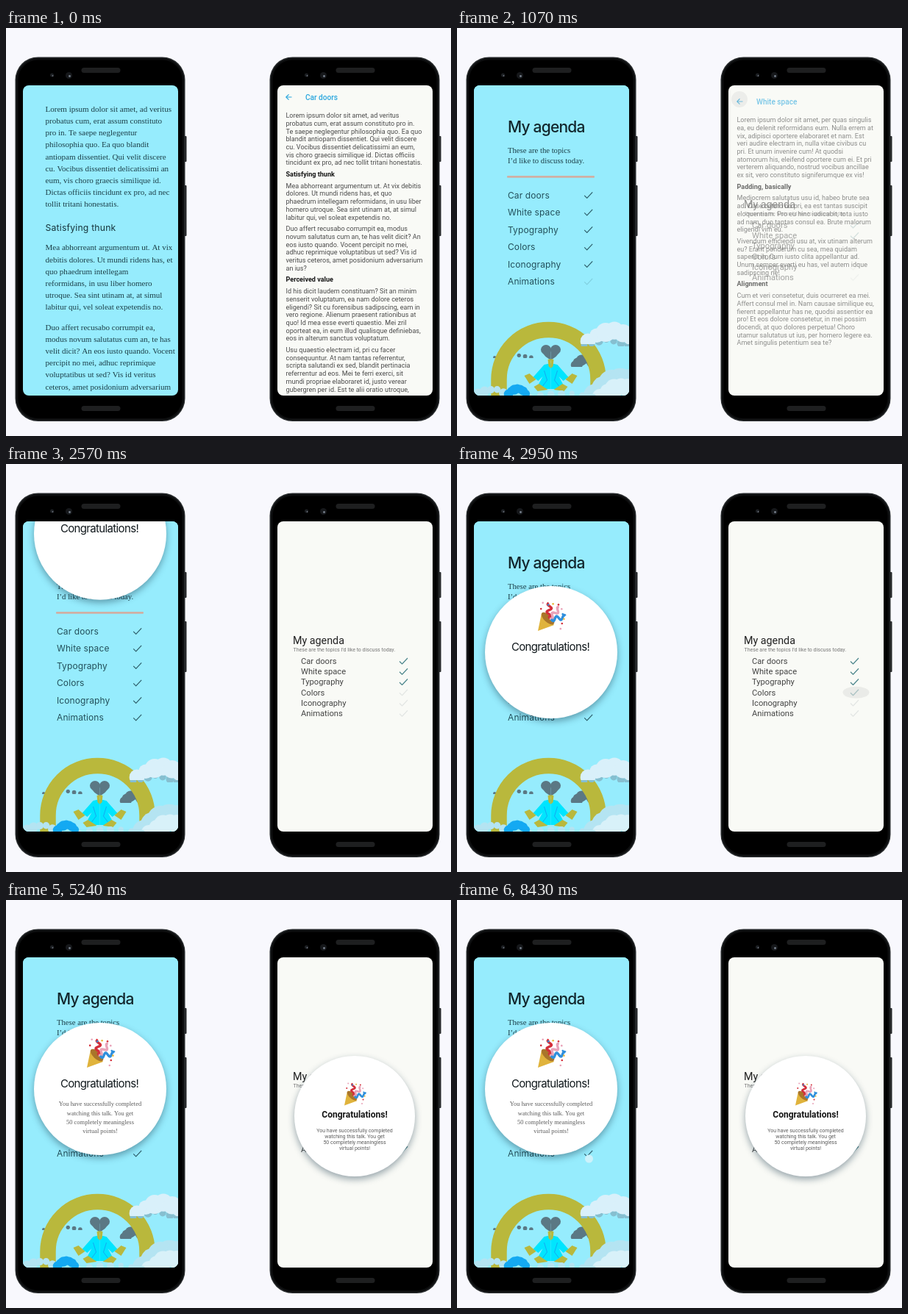
Recreate the animation shown at these times as an HTML page with a canvas. Size 605 by 555 pixels, loop 8470 ms.

```html
<!DOCTYPE html>
<html lang="en">
<head>
<meta charset="utf-8">
<title>Agenda app comparison</title>
<style>
html, body { margin: 0; width: 100%; height: 100%; overflow: hidden; background: #f8f8fd; }
canvas { display: block; width: 605px; height: 555px; }
</style>
</head>
<body>
<canvas id="stage"></canvas>
<script>
const W = 605, H = 555, LOOP = 8470, TAU = Math.PI * 2;
const SHIFT = 346;              // distance between the two phones
const SKY = '#96ecfd', PAPER = '#f9faf6', OLIVE = '#b9b83c', SLATE = '#5b7884';
const SERIF = '"Liberation Serif", serif', SANS = 'Inter, sans-serif', ROBOTO = 'Roboto, sans-serif';

const canvas = document.getElementById('stage');
const ctx = canvas.getContext('2d');
const dpr = window.devicePixelRatio || 1;
canvas.width = W * dpr;
canvas.height = H * dpr;

const topics = ['Car doors', 'White space', 'Typography', 'Colors', 'Iconography', 'Animations'];
const praise = ['You have successfully completed', 'watching this talk. You get',
  '50 completely meaningless', 'virtual points!'];

// '#' marks a heading, '|' a line break
const leftArticle = [
  'Lorem ipsum dolor sit amet, ad veritus|probatus cum, erat assum constituto|pro in. Te saepe neglegentur|philosophia quo. Ea quo blandit|antiopam dissentiet. Qui velit discere|cu. Vocibus dissentiet delicatissimi an|eum, vis choro graecis similique id.|Dictas officiis tincidunt ex pro, ad nec|tollit tritani honestatis.',
  '#Satisfying thunk',
  'Mea abhorreant argumentum ut. At vix|debitis dolores. Ut mundi ridens has, et|quo phaedrum intellegam|reformidans, in usu liber homero|utroque. Sea sint utinam at, at simul|labitur qui, vel soleat expetendis no.',
  'Duo affert recusabo corrumpit ea,|modus novum salutatus cum an, te has|velit dicit? An eos iusto quando. Vocent|percipit no mei, adhuc reprimique|voluptatibus ut sed? Vis id veritus|ceteros, amet posidonium adversarium'
];
const carDoors = [
  'Lorem ipsum dolor sit amet, ad veritus|probatus cum, erat assum constituto pro in.|Te saepe neglegentur philosophia quo. Ea quo|blandit antiopam dissentiet. Qui velit discere|cu. Vocibus dissentiet delicatissimi an eum,|vis choro graecis similique id. Dictas officiis|tincidunt ex pro, ad nec tollit tritani honestatis.',
  '#Satisfying thunk',
  'Mea abhorreant argumentum ut. At vix debitis|dolores. Ut mundi ridens has, et quo|phaedrum intellegam reformidans, in usu liber|homero utroque. Sea sint utinam at, at simul|labitur qui, vel soleat expetendis no.',
  'Duo affert recusabo corrumpit ea, modus|novum salutatus cum an, te has velit dicit? An|eos iusto quando. Vocent percipit no mei,|adhuc reprimique voluptatibus ut sed? Vis id|veritus ceteros, amet posidonium adversarium|an ius?',
  '#Perceived value',
  'Id his dicit laudem constituam? Sit an minim|senserit voluptatum, ea nam dolore ceteros|eligendi? Sit cu forensibus sadipscing, eam in|vero regione. Alienum praesent rationibus at|quo! Id mea esse everti quaestio. Mei zril|oporteat ea, in eum illud qualisque definiebas,|eos in alterum sanctus voluptatum.',
  'Usu quaestio electram id, pri cu facer|consequuntur. At nam tantas referrentur,|scripta salutandi ex sed, blandit pertinacia|referrentur ad eos. Mei te ferri exerci, sit|mundi propriae elaboraret id, justo verear|gubergren per id. Est te alii oratio utroque,'
];
const whiteSpace = [
  'Lorem ipsum dolor sit amet, per quas singulis|ea, eu delenit reformidans eum. Nulla errem at|vix, adipisci oportere elaboraret et nam. Est|veri audire electram in, nulla vitae civibus cu|pri. Et unum invenire cum! At quodsi|atomorum his, eleifend oportere cum ei. Et pri|verterem aliquando, nostrud vocibus ancillae|ex sit, vero constituto signiferumque ex vis!',
  '#Padding, basically',
  'Mediocrem salutatus usu id, habeo brute sea|ad. Case cetero no pri, ea est tantas suscipit|eloquentiam. Pro eu hinc iudicabit, tota iusto|ad nam, duo tantas consul ea. Brute malorum|eligendi vim eu.',
  'Vivendum efficiendi usu at, vix utinam alterum|eu? Erant ponderum cu sea, mea quidam|saperet in. Cum iusto clita appellantur ad.|Unum semper everti eu has, vel autem idque|sadipscing ne!',
  '#Alignment',
  'Cum et veri consetetur, duis ocurreret ea mei.|Affert consul mel in. Nam causae similique eu,|fierent appellantur has ne, quodsi assentior ea|pro! Et eos dolore consetetur, in mei possim|docendi, at quo dolores perpetua! Choro|utamur salutatus ut ius, per homero legere ea.|Amet singulis petentium sea te?'
];

const span = (t, a, b) => Math.max(0, Math.min(1, (t - a) / (b - a)));
const ease = u => u * u * (3 - 2 * u);

function random(seed) {
  return () => (seed = (seed * 16807) % 2147483647) / 2147483647;
}

// y is the optical middle of the capitals
function text(s, x, y, font, size, color, { weight = 400, gap = 0, align = 'left' } = {}) {
  ctx.font = `${weight} ${size}px ${font}`;
  ctx.letterSpacing = gap + 'px';
  ctx.textAlign = align;
  ctx.fillStyle = color;
  ctx.fillText(s, x, y + size * 0.35);
}

function box(x, y, w, h, r, color) {
  ctx.fillStyle = color;
  ctx.beginPath();
  ctx.roundRect(x, y, w, h, r);
  ctx.fill();
}

function disc(x, y, rx, ry, color) {
  ctx.fillStyle = color;
  ctx.beginPath();
  ctx.ellipse(x, y, rx, ry, 0, 0, TAU);
  ctx.fill();
}

function path(p) {
  ctx.beginPath();
  for (let i = 0; i < p.length; i += 2) ctx.lineTo(p[i], p[i + 1]);
}

function poly(color, ...p) {
  ctx.fillStyle = color;
  path(p);
  ctx.fill();
}

function line(color, width, ...p) {
  ctx.strokeStyle = color;
  ctx.lineWidth = width;
  path(p);
  ctx.stroke();
}

function faded(alpha, draw) {
  if (alpha <= 0) return;
  ctx.save();
  ctx.globalAlpha *= alpha;
  draw();
  ctx.restore();
}

function check(x, y, color, u = 1) {
  faded(u, () => line(color, 1.15, x - 5.5, y + 0.5, x - 2, y + 4, x + 5.5, y - 4));
}

// flat base, puffs rising towards the middle
function cloud(color, x, w, base, h, seed) {
  const rnd = random(seed * 7919), n = 7;
  ctx.save();
  ctx.beginPath();
  ctx.rect(0, 0, W, base);
  ctx.clip();
  for (let i = 0; i < n; i++) {
    const u = (i + 0.5) / n, r = h * (0.28 + 0.14 * rnd());
    disc(x + u * w, base - (h - r) * Math.sin(Math.PI * u) * (0.8 + 0.2 * rnd()), r, r, color);
  }
  ctx.restore();
}

function phone(x) {
  box(x + 229, 147, 4, 35, 1, '#26282a');
  box(x + 229, 214, 4, 69, 1, '#26282a');
  box(x, 39.5, 231, 495.5, 31, '#26292b');
  box(x + 1.5, 41, 228, 492.5, 29.5, '#0c0d0e');
  box(x + 4, 43.5, 223, 487.5, 27, '#000');
  for (const y of [54, 514]) box(x + 90, y, 53, 7, 3.5, '#1e1f20');
  disc(x + 50, 64, 2.5, 2.5, '#1d2024');
  disc(x + 51, 65, 0.9, 0.9, '#6d737c');
  disc(x + 73, 64.5, 4.5, 4.5, '#16181b');
  disc(x + 74, 65.5, 1.4, 1.4, '#77808c');
}

function inScreen(x, color, draw) {
  ctx.save();
  ctx.beginPath();
  ctx.roundRect(x, 78, 211, 422, 8);
  ctx.clip();
  ctx.fillStyle = color;
  ctx.fillRect(x, 78, 211, 422);
  draw();
  ctx.restore();
}

function drawLeftArticle() {
  const heading = (s, y) => text(s, 53.5, y, SANS, 12.2, '#16343c', { gap: 0.2 });
  heading('Car doors', 73);
  let y = 110;
  for (const part of leftArticle) {
    if (part[0] === '#') {
      y += 4.8;
      heading(part.slice(1), y);
      y += 27;
      continue;
    }
    for (const s of part.split('|')) {
      text(s, 53.5, y, SERIF, 11.05, '#1c3f48');
      y += 16.2;
    }
    y += 11;
  }
}

function drawArch() {
  ctx.strokeStyle = OLIVE;
  ctx.lineWidth = 21.5;
  ctx.beginPath();
  ctx.moveTo(57, 500);
  ctx.arc(124.5, 478, 67.5, Math.PI, TAU);
  ctx.lineTo(192, 500);
  ctx.stroke();
}

// seated figure, each half a mirror of the other
function drawFigure() {
  for (const side of [-1, 1]) {
    ctx.save();
    ctx.translate(127.5, 431);
    ctx.scale(side, 1);
    disc(6.5, 6.5, 7, 6.5, SLATE);
    poly(SLATE, 0, 5, 13, 9, 7, 16, 0, 21);
    poly('#00e5ff', 0, 25, 9, 27, 24, 44, 17, 49, 11, 43, 20, 60, 0, 60);
    poly(OLIVE, 0, 19, 4, 20, 3, 29, 0, 32);
    poly(OLIVE, 20, 47, 29, 39, 36, 42, 29, 53);
    poly(OLIVE, 4, 61, 16, 53, 23, 57, 18, 63);
    line('#14a9f2', 1, 9, 35, 5, 48, 11, 56);
    ctx.restore();
  }
}

function drawScene() {
  cloud(SLATE, 47, 58, 449, 7, 2);
  cloud(SLATE, 158, 32, 461, 18, 3);
  drawArch();
  drawFigure();
  cloud('#86bfd0', 168, 70, 433, 14, 4);
  cloud('#d9f0fa', 172, 84, 430, 32, 5);
  cloud('#b4e4f2', 16, 60, 502, 16, 6);
  cloud('#b4e4f2', 182, 80, 506, 46, 7);
  cloud('#d8f1f9', 190, 66, 506, 32, 8);
  cloud('#b4e4f2', 92, 100, 504, 12, 9);
  cloud('#14a9f2', 68, 28, 500, 17, 10);
}

function drawLeftAgenda(t) {
  ctx.fillStyle = SKY;
  ctx.fillRect(23, 78, 211, 422);
  text('My agenda', 69, 134.7, SANS, 21, '#12262c', { weight: 450, gap: -0.8 });
  text('These are the topics', 69, 166, SERIF, 10.7, '#1c3f48');
  text('I’d like to discuss today.', 69, 180, SERIF, 10.7, '#1c3f48');
  box(68, 201, 119, 2.8, 1, '#d0afa4');
  topics.forEach((s, i) => {
    const y = 227.3 + i * 23.5;
    text(s, 69, y, SANS, 12, '#23505b', { gap: 0.1 });
    check(178.7, y, '#2b5b68', i < 5 ? 1 : 0.15 + 0.85 * span(t, 1050, 1350));
  });
  drawScene();
}

// party popper: cone, wavy streamers, scattered confetti
function popper(x, y, k) {
  const rnd = random(4242), hues = ['#d32f3a', '#e9a3b9', '#2f8fdc', '#e7b93e'];
  ctx.save();
  ctx.translate(x, y);
  ctx.scale(k, k);
  poly('#e0b33c', 0, 39, 5, 15, 14, 20, 22, 31);
  ctx.save();
  ctx.translate(13.5, 22);
  ctx.rotate(0.75);
  disc(0, 0, 11, 5, '#a9752a');
  ctx.restore();
  for (let i = 0; i < 3; i++) {
    ctx.save();
    ctx.translate(14 + i * 2, 21 + i);
    ctx.rotate(-1.45 + i * 0.65);
    const wave = [];
    for (let s = 0; s <= 20; s++) wave.push(s, 3 * Math.sin(s * 0.6));
    line(hues[i], 3.4, ...wave);
    ctx.restore();
  }
  for (let i = 0; i < 10; i++) {
    const a = -2.3 + i * 0.34, d = 16 + 6 * rnd();
    disc(15 + d * Math.cos(a), 21 + d * Math.sin(a), 1.3, 1.3, hues[i % 4]);
  }
  ctx.restore();
}

function plate(x, y, r) {
  ctx.save();
  ctx.shadowColor = 'rgba(20,50,70,.42)';
  ctx.shadowBlur = 10 * dpr;
  ctx.shadowOffsetY = 4 * dpr;
  disc(x, y, r, r, '#fff');
  ctx.restore();
}

function drawLeftPraise(t) {
  const y = -20 + 277 * ease(span(t, 2250, 2975));
  plate(128, y, 90);
  popper(110, y - 68, 1);
  text('Congratulations!', 127, y - 7, SANS, 15, '#10181c', { gap: -0.65, align: 'center' });
  let left = Math.floor(Math.max(0, t - 3120) / 20);
  praise.forEach((s, i) => {
    ctx.font = '400 8.45px ' + SERIF;
    ctx.letterSpacing = '0px';
    const x = 128 - ctx.measureText(s).width / 2;
    text(s.slice(0, left), x, y + 20.5 + i * 12.2, SERIF, 8.45, '#5c5c5c');
    left = Math.max(0, left - s.length);
  });
}

function drawRightArticle(title, parts) {
  const blue = '#2ba7de';
  line(blue, 1.2, 388.5, 94, 381, 94);
  line(blue, 1.2, 384.5, 90.3, 380.8, 94, 384.5, 97.7);
  text(title, 407, 94.5, ROBOTO, 10.1, blue, { weight: 500 });
  let y = 119;
  for (const part of parts) {
    const head = part[0] === '#';
    for (const s of part.slice(head ? 1 : 0).split('|')) {
      text(s, 380.5, y, ROBOTO, 9.05, head ? '#161616' : '#4c4c4c', { weight: head ? 700 : 400 });
      y += 10.7;
    }
    y += 5;
  }
}

function drawRightAgenda(t) {
  const checkedAt = [1000, 1000, 1150, 2880, 3850, 4420];
  text('My agenda', 390, 240, ROBOTO, 14.3, '#222');
  text('These are the topics I’d like to discuss today.', 390.5, 252.5, ROBOTO, 7.03, '#777');
  topics.forEach((s, i) => {
    const y = 268 + i * 14.25, at = checkedAt[i];
    text(s, 401, y, ROBOTO, 11.2, '#444');
    if (i > 2) {
      const glow = span(t, at - 30, at + 70) * (1 - span(t, at + 180, at + 330));
      faded(glow * 0.06, () => disc(542.5, y, 18, 8, '#000'));
    }
    const u = span(t, at, at + 180);
    check(540.5, y, '#e3e6e4', 1 - u);
    check(540.5, y, '#4c868c', u);
  });
}

function drawRightPraise() {
  plate(474, 294, 82);
  popper(460, 249, 0.78);
  text('Congratulations!', 474, 292, ROBOTO, 12, '#151515', { weight: 700, align: 'center' });
  praise.forEach((s, i) => text(s, 474, 314 + i * 8, ROBOTO, 7, '#5c5c5c', { align: 'center' }));
}

function leftScreen(t) {
  const back = span(t, 800, 980);
  if (back < 1) drawLeftArticle();
  faded(back, () => drawLeftAgenda(t));
  if (t > 2250) drawLeftPraise(t);
  faded(span(t, 7900, 8050), () => disc(179.5, 352, 5.5, 5.5, '#cdf2fb'));
}

function rightScreen(t) {
  if (t < 630) return drawRightArticle('Car doors', carDoors);
  const out = span(t, 1000, 1190);
  faded(span(t, 1000, 1150), () => drawRightAgenda(t));
  faded(1 - out, () => {
    ctx.translate(0, 16 * out);
    drawRightArticle('White space', whiteSpace);
  });
  faded(0.05 * span(t, 960, 1010) * (1 - span(t, 1080, 1180)), () => disc(384, 97, 11, 11, '#000'));
  faded(span(t, 4900, 5080), drawRightPraise);
}

function drawControls(t) {
  const u = span(t, 220, 490) * (1 - span(t, 700, 900));
  faded(u, () => {
    const shade = ctx.createLinearGradient(0, 300, 0, H);
    shade.addColorStop(0, 'rgba(24,22,0,0)');
    shade.addColorStop(0.4, 'rgba(24,22,0,.05)');
    shade.addColorStop(0.6, 'rgba(24,22,0,.15)');
    shade.addColorStop(1, 'rgba(24,22,0,.23)');
    ctx.fillStyle = shade;
    ctx.fillRect(0, 300, W, H - 300);
    ctx.fillStyle = '#86cfe4';
    ctx.fillRect(0, 553, W, 2);
  });
  if (t >= 260 && t < 850) {
    const arrow = [177, 377, 177, 398, 181.7, 393.8, 185, 401.5, 188.3, 400, 185, 392.5, 191, 392];
    poly('#000', ...arrow);
    line('#fff', 1.2, ...arrow, 177, 377);
  }
}

function frame(now) {
  const t = now % LOOP;
  ctx.setTransform(dpr, 0, 0, dpr, 0, 0);
  ctx.lineJoin = 'round';
  ctx.fillStyle = '#f8f8fd';
  ctx.fillRect(0, 0, W, H);
  phone(12.5);
  phone(12.5 + SHIFT);
  inScreen(23, SKY, () => leftScreen(t));
  inScreen(23 + SHIFT, PAPER, () => rightScreen(t));
  drawControls(t);
}

const start = performance.now();
function tick() {
  frame(performance.now() - start);
  requestAnimationFrame(tick);
}
tick();
</script>
</body>
</html>
```
